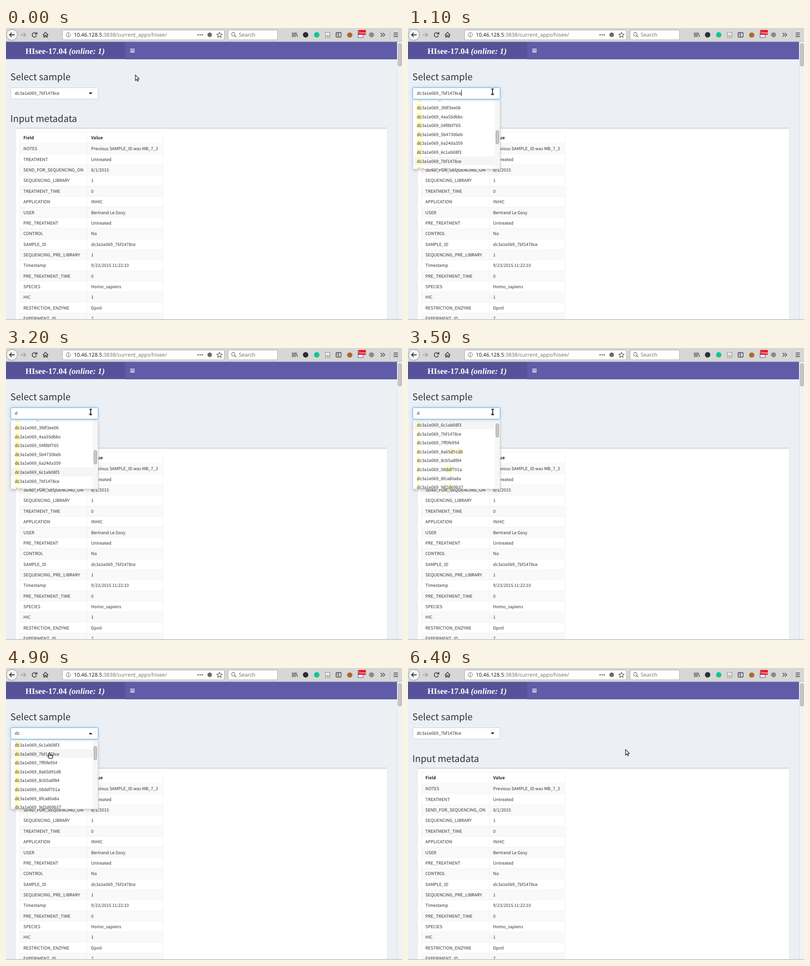
Write an HTML page that moves like this. It is 871 px wide and 643 px high and loops after 8 s.

```html
<!DOCTYPE html>
<html lang="en">
<head>
<meta charset="utf-8">
<title>Sample selection</title>
<style>
  html, body { margin: 0; width: 100%; height: 100%; overflow: hidden; background: #ecf0f5; }
  body { position: relative; text-rendering: geometricPrecision; }
  svg, div { position: absolute; box-sizing: border-box; }
  svg { left: 0; top: 0; }
  svg, .select, .menu { font: 9.46px "Noto Sans CJK JP", "Noto Sans CJK SC", "Noto Sans", sans-serif; }
  .ui { font-family: "Noto Sans", sans-serif; font-size: 11.6px; }
  .select {
    left: 9.5px; top: 131px; width: 193px; height: 26px; padding-left: 9px;
    border: 1px solid #ccc; border-radius: 3px; background: #fff;
    color: #333; line-height: 23.4px; white-space: pre;
  }
  .select.open { border-color: #66afe9; box-shadow: 0 0 6px rgba(102, 175, 233, .6); }
  .select.caret span { border-right: 1px solid #111; }
  .triangle { left: 171px; top: 10px; border: 4px solid transparent; border-top: 4.5px solid #111; border-bottom: 0; }
  .open .triangle { border-top: 0; border-bottom: 4.5px solid #111; }
  .menu {
    left: 10px; top: 158px; width: 192.5px; height: 152.5px; overflow: hidden;
    border: 1px solid #d0d0d0; border-top-color: #e4e4e4; border-radius: 0 0 3px 3px; background: #f6f6f6;
  }
  .shadow { left: 10px; top: 158px; width: 192.5px; height: 152.5px; box-shadow: 0 3px 6px rgba(0, 0, 0, .175); }
  .list { left: 0; top: 0; width: 180px; height: 151px; overflow: hidden; background: #fff; }
  .rows { left: 0; width: 180px; }
  .rows p { margin: 0; height: 19.6px; padding-left: 8.5px; line-height: 20.2px; color: #333; white-space: pre; }
  .rows p.active { background: #f5f5f5; }
  mark { background: #fff8a9; color: inherit; }
  .thumb { left: 182.2px; width: 7px; height: 31px; border: 1px solid #999; border-radius: 3.5px; background: #c9c9c9; }
</style>
</head>
<body>
<svg id="page" width="871" height="643"></svg>
<div id="popup">
  <div class="shadow"></div>
  <div class="menu">
    <div class="list"><div class="rows" id="rows"></div></div>
    <div class="thumb" id="thumb"></div>
  </div>
</div>
<div class="select" id="select"><span id="value"></span><div class="triangle"></div></div>
<svg id="pointer" width="871" height="643"></svg>
<script>
const $ = id => document.getElementById(id);
const rect = (x, y, w, h, fill, more = '') =>
  `<rect x="${x}" y="${y}" width="${w}" height="${h}" fill="${fill}" ${more}/>`;
const circle = (x, y, r, fill, more = '') => `<circle cx="${x}" cy="${y}" r="${r}" fill="${fill}" ${more}/>`;
const line = (d, color = '#444', width = 1.5, fill = 'none') =>
  `<path d="${d}" stroke="${color}" stroke-width="${width}" fill="${fill}"/>`;
const text = (x, y, str, fill = '#333', more = '') =>
  `<text x="${x}" y="${y}" fill="${fill}" ${more}>${str}</text>`;

const sample = 'dc3a1e069_7bf1478ce';
const metadata = [
  ['NOTES', 'Previous SAMPLE_ID was MB_7_3'],
  ['TREATMENT', 'Untreated'],
  ['SEND_FOR_SEQUENCING_ON', '8/1/2015'],
  ['SEQUENCING_LIBRARY', '1'],
  ['TREATMENT_TIME', '0'],
  ['APPLICATION', 'INHIC'],
  ['USER', 'Bertrand Le Gosy'],
  ['PRE_TREATMENT', 'Untreated'],
  ['CONTROL', 'No'],
  ['SAMPLE_ID', sample],
  ['SEQUENCING_PRE_LIBRARY', '1'],
  ['Timestamp', '9/23/2015 11:22:10'],
  ['PRE_TREATMENT_TIME', '0'],
  ['SPECIES', 'Homo_sapiens'],
  ['HIC', '1'],
  ['RESTRICTION_ENZYME', 'DpnII'],
  ['EXPERIMENT_ID', '7'],
];
const options = ('3a1bc1527 3fdf3ee06 4aa55dbbc 04f8bf765 5b47306eb 6a24da359 6c1ab08f3 7bf1478ce ' +
  '7ff0fe954 8a65d91d8 8cb5a8f84 08ddf701a 8fca80a8a 9d2d69b37').split(' ').map(id => 'dc3a1e069_' + id);

function toolbar() {
  const field = 'stroke="#a9a9a9" rx="2.5"';
  return rect(0, 0, 871, 30, '#d7d7d7') + rect(0, 29.5, 871, 1, '#b4b4b4') +
    circle(13, 15, 12, '#f5f5f5', 'stroke="#8c8c8c"') +
    line('M19 15H8M12.5 10.3L7.8 15L12.5 19.7', '#333', 1.8) +
    line('M32 15H43M38.7 10.3L43.4 15L38.7 19.7', '#a5a5a5', 1.8) +
    line('M66.3 12.2A4.8 4.8 0 1 0 67 16.5M67.8 9V13.4H63.4', '#3c3c3c', 1.7) +
    line('M81 15.5L87 9.7L93 15.5M83 14.5V20H85.6V16.2H88.4V20H91V14.5', '#3c3c3c', 1.6) +
    rect(124.5, 4.5, 356, 21.5, '#fff', field) +
    circle(137, 15, 4.8, 'none', 'stroke="#666"') + line('M137 14V18M137 11.8V13', '#666', 1.3) +
    text(149, 19.2, '10.46.128.5<tspan fill="#777">:3838/current_apps/hisee/</tspan>', '#222', 'class="ui"') +
    [422.5, 427, 431.5].map(x => circle(x, 15, 1.5, '#555')).join('') +
    circle(448, 15, 5, '#6a6a6a') +
    line('M469.5 9.3L471.2 13.2L475.3 13.6L472.2 16.4L473.1 20.5L469.5 18.4L465.9 20.5L466.8 16.4L463.7 13.6L467.8 13.2Z', '#555', 1.2) +
    rect(488.5, 4.5, 108.5, 21.5, '#fff', field) +
    circle(500, 13.8, 3.8, 'none', 'stroke="#777" stroke-width="1.3"') + line('M502.8 16.6L506.3 20.1', '#777') +
    text(512, 19.2, 'Search', '#777', 'class="ui"') +
    line('M630 10V20M633 10V20M636 10V20M638 10.3L641.3 19.8', '#444', 1.4) +
    circle(659, 15, 6, '#2c2f31') + circle(683.5, 15, 6, '#15c39a') +
    rect(702.5, 9.5, 10, 11.5, '#e9e9e9', 'stroke="#888"') + line('M704.5 16.5H710.5M704.5 18.5H710.5', '#888', 1) +
    rect(726, 10, 11, 10, 'none', 'stroke="#444" stroke-width="1.4" rx="1"') +
    line('M731.5 10V20M727.5 13H730M727.5 15.5H730', '#444', 1.2) +
    circle(756, 15.5, 5.8, '#ad6a2b') +
    rect(774.5, 11, 11, 10, '#f4f7fb', 'stroke="#4c78b5" stroke-width="1.3"') +
    rect(774.5, 4.5, 17, 10.5, '#e20f16', 'rx="1"') +
    text(775.7, 12.6, 'New', '#fff', 'style="font:7.6px \'Noto Sans\',sans-serif"') +
    circle(804, 15, 5.6, '#8b8b8b') +
    line('M824 10.8L828 15L824 19.2M829 10.8L833 15L829 19.2') +
    rect(844, 5, 1, 20, '#bcbcbc') + line('M852.5 11H862M852.5 15H862M852.5 19H862');
}

function table() {
  const top = 253.9, pitch = 23.37;
  const rows = metadata.map(([name, value], i) => {
    const y = top + i * pitch;
    return (i % 2 ? '' : rect(29, y, 317, pitch, '#f9f9f9')) + rect(29, y - .5, 317, 1, '#f4f4f4') +
      text(38.3, y + 15.4, name) + text(187.3, y + 15.4, value);
  }).join('');
  const bold = 'font-weight="700"';
  return rows + rect(29, 229.5, 317, 1, '#f4f4f4') +
    [29, 178, 345.3].map(x => rect(x, 229.5, 1, 412, '#f2f2f2')).join('') +
    text(38.3, 245, 'Field', '#222', bold) + text(187.3, 245, 'Value', '#222', bold);
}

function page() {
  const heading = 'style="font-size:20.4px"';
  return toolbar() +
    rect(262, 30.5, 598, 38.5, '#605ca8') + rect(0, 30.5, 262, 38, '#555299') +
    text(42.8, 56.6, 'HIsee-17.04 <tspan font-style="italic">(online: 1)</tspan>', '#fff',
      'style="font:700 18.1px \'Liberation Serif\',serif"') +
    line('M273.3 46.5H283M273.3 49.7H283M273.3 52.9H283', '#fff', 1.6) +
    text(9.5, 115, 'Select sample', '#333', heading) + text(9.5, 207, 'Input metadata', '#333', heading) +
    rect(21.5, 220, 817, 423, '#dfe3e8') + rect(22, 220, 816, 423, '#fff') +
    rect(22, 219.5, 816, 2.3, '#d2d6de', 'rx="1"') + table() +
    rect(860, 30.5, 11, 612, '#f2f2f2') + rect(860, 30.5, 1, 612, '#dcdcdc') +
    rect(863, 34, 6.5, 50, '#c9c9c9', 'rx="3.2" stroke="#999"') +
    rect(0, 641, 871, 2, '#cdcdcd');
}

const ibeam = 'M-2.5 -6H2.5M0 -6V6M-2.5 6H2.5';
const shapes = {
  arrow: line('M.5 .5V12.7L3.3 10L5.3 14.4L7.2 13.5L5.3 9.3H9Z', '#111', 1.1, '#fff'),
  hand: line('M-1.3 1.4Q0 -.8 1.3 1.4V4.6L5.6 5.2Q7.2 5.5 7.2 7V9.5L6 12.6H-.3L-3.3 8.4Q-3.8 6.5 -2.5 6.4L-1.3 7.6Z' +
    'M1.3 4.6V7M3.3 5V7M5.2 5.2V7.2', '#111', 1.2, '#fff'),
  beam: line(ibeam, '#fff', 3.6) + line(ibeam, '#111', 1.8),
};

// Each entry holds from its time until the next one.
const moves = [
  [0, 'arrow', 284, 103], [200, 'arrow', 277, 105.5], [300, 'arrow', 258, 112], [400, 'arrow', 235, 120],
  [500, 'arrow', 211, 129], [600, 'hand', 192, 135.5], [700, 'hand', 185, 138],
  [1100, 'beam', 185.8, 140.5], [1400, 'beam', 186.3, 141], [3900, 'beam', 187, 142],
  [4400, 'beam', 180, 149], [4500, 'hand', 148, 167], [4600, 'hand', 117, 180],
  [4800, 'hand', 106, 183], [4900, 'hand', 95.5, 186.5], [5600, 'beam', 97, 189.5],
  [5800, 'arrow', 205, 177], [5900, 'arrow', 319, 169], [6100, 'arrow', 476.5, 178.3], [6400, 'arrow', 478, 179],
];

const closed = { value: sample };
const browsing = { open: true, value: sample, caret: true, query: 'dc', scroll: 13.6, active: 7, thumb: 225 };
const cleared = { ...browsing, value: '', caret: false, active: 6 };
const filtered = { ...cleared, value: 'd', query: 'd', scroll: 6 * 19.6, thumb: 165.5 };
const narrowed = { ...filtered, value: 'dc', query: 'dc', thumb: 169 };
const settled = { ...narrowed, thumb: 172 };
const states = [
  [0, closed], [1100, browsing], [2300, cleared], [3200, { ...cleared, value: 'd' }],
  [3500, filtered], [3600, narrowed], [3700, settled], [4600, { ...settled, active: 7 }], [5600, closed],
];

const current = (track, t) => track.findLast(([start]) => start <= t);

function showState({ open = false, caret = false, value, query, scroll, active, thumb }) {
  $('select').classList.toggle('open', open);
  $('select').classList.toggle('caret', caret);
  $('value').textContent = value;
  $('popup').style.display = open ? 'block' : 'none';
  if (!open) return;
  $('rows').style.top = -scroll + 'px';
  $('rows').innerHTML = options.map((name, i) =>
    `<p${i === active ? ' class="active"' : ''}>${name.replaceAll(query, '<mark>$&</mark>')}</p>`).join('');
  $('thumb').style.top = thumb - 159 + 'px';
}

function showPointer([, shape, x, y]) {
  $('pointer').innerHTML = `<g transform="translate(${x} ${y})">${shapes[shape]}</g>`;
}

let lastState, lastMove;
function frame() {
  const t = performance.now() % 8000;
  const state = current(states, t), move = current(moves, t);
  if (state !== lastState) showState((lastState = state)[1]);
  if (move !== lastMove) showPointer(lastMove = move);
  requestAnimationFrame(frame);
}

$('page').innerHTML = page();
frame();
</script>
</body>
</html>
```
